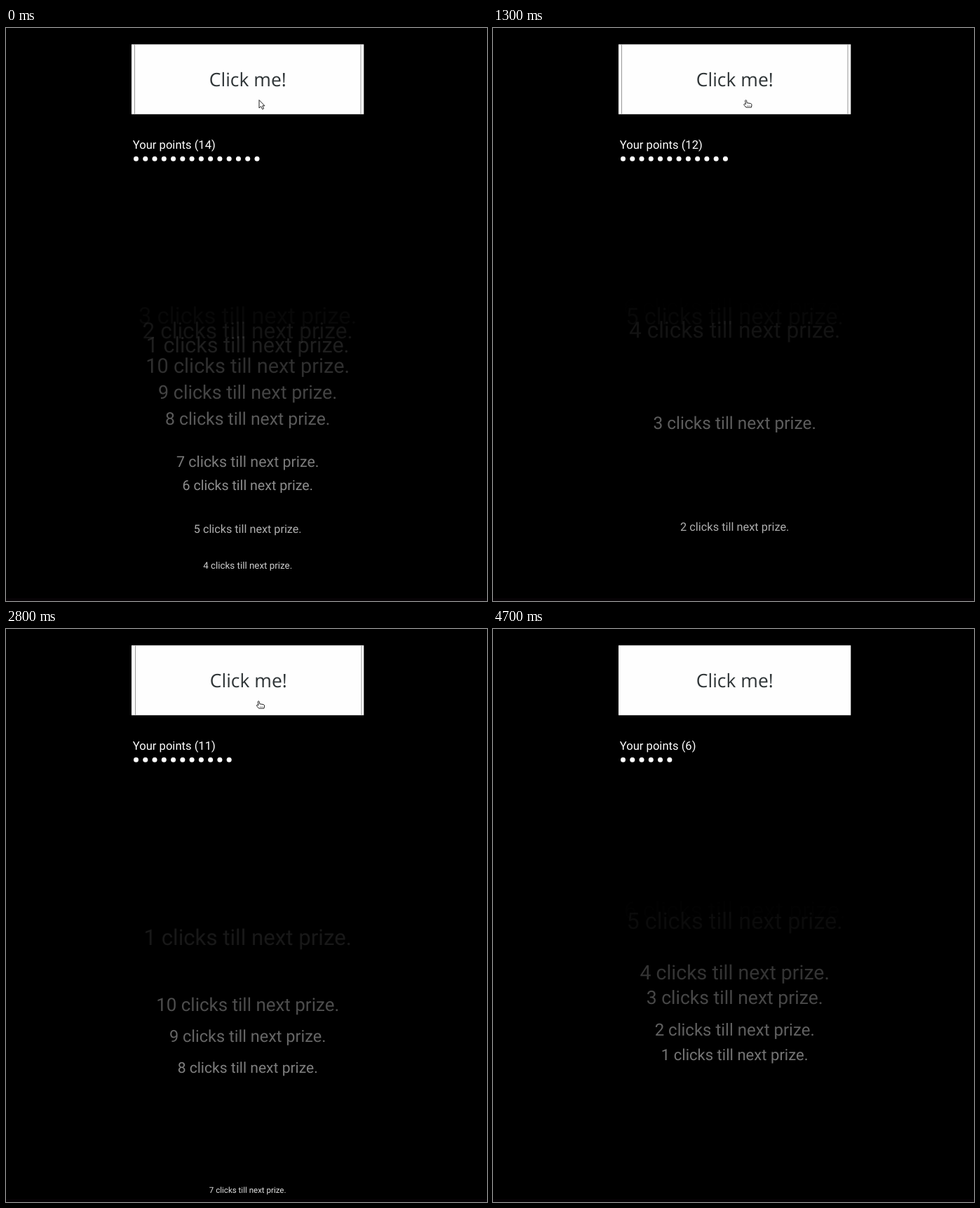
Recreate the animation shown at these times as an HTML page. Size 686 px wide and 816 px high, loop 4.8 s.

```html
<!DOCTYPE html>
<html lang="en">
<head>
<meta charset="utf-8">
<title>Click me!</title>
<style>
  html, body { margin: 0; width: 100%; height: 100%; overflow: hidden; background: #000; }
  svg { display: block; width: 686px; height: 816px; }
  text { font-family: Roboto, sans-serif; fill: #fff; text-rendering: geometricPrecision; }
  #label { font: 26.5px "Open Sans", "Noto Sans", sans-serif; fill: #2e3436; }
  #points { font-size: 16.6px; }
  #messages text, #label { text-anchor: middle; }
  #cursor path { fill: #fff; stroke: #222; stroke-linejoin: round; }
</style>
</head>
<body>
<svg viewBox="0 0 686 816">
  <rect width="686" height="816"/>
  <rect y="812" width="686" height="4" fill="#070306"/>
  <rect x="179" y="23.3" width="331.3" height="99.5" fill="#fefefe"/>
  <g id="face">
    <path id="focus" d="M183.5 23.5V122.5M506 23.5V122.5" stroke="#999" fill="none"/>
    <text id="label" x="344.8" y="83">Click me!</text>
  </g>
  <text id="points" x="180.8" y="171.8"></text>
  <g id="dots" fill="#fff"></g>
  <g id="messages"></g>
  <g id="cursor">
    <path id="arrow" d="M0 0V11.5L2.7 9L4.6 13.2L6.6 12.3L4.8 8.3H8Z"/>
    <g id="hand">
      <path d="M-1 .8Q0 -.6 1 .8L1.6 4.2L7 5Q8.6 5.5 8.4 7.5L7.8 10.5H.3L-2.8 6.8Q-2.8 5.3 -1.2 5.6L-.2 6.2Z"/>
      <path d="M2 8.5H6.8" style="stroke-dasharray:1 1.2"/>
    </g>
  </g>
</svg>
<script>
const LOOP = 4800, STEP = 100, RISE = 1900;
const NS = "http://www.w3.org/2000/svg";
const $ = id => document.getElementById(id);

// [clicks left, moment of the click, points afterwards]
const clicks = [
  [3, -1628, 14], [2, -1448, 14], [1, -1319, 14], [10, -1159, 14], [9, -984, 14],
  [8, -823, 14], [7, -595, 14], [6, -479, 14], [5, -276, 14], [4, -120, 14],
  [3, 540, 13], [2, 1056, 12], [1, 1562, 11], [10, 2048, 14], [9, 2225, 13],
  [8, 2390, 12], [7, 2935, 11], [6, 3132, 10], [5, 3323, 10], [4, 3776, 8],
  [3, 3938, 7], [2, 4126, 6], [1, 4259, 6]
];
// The page clock runs slightly unevenly against playback time.
const clockKeys = [[0, 0], [700, 700], [2000, 2090], [2800, 2960], [3300, 3485], [4000, 4185], [4700, 4895]];
const cursorX = [[0, 361], [100, 361], [700, 361], [2000, 360.2], [3600, 360.2], [4000, 349], [4100, 285], [4200, 159]];
const cursorY = [[0, 102.5], [3600, 102.5], [4000, 101.8], [4200, 101.8]];

function add(parent, tag, attrs) {
  const el = document.createElementNS(NS, tag);
  set(el, attrs);
  return parent.appendChild(el);
}
function set(el, attrs) {
  for (const name in attrs) el.setAttribute(name, attrs[name]);
}
function show(el, on) {
  el.style.display = on ? "" : "none";
}
function sample(keys, t) {
  let i = 1;
  while (i < keys.length - 1 && t > keys[i][0]) i++;
  const [t0, a] = keys[i - 1], [t1, b] = keys[i];
  return a + (b - a) * (t - t0) / (t1 - t0);
}
// cubic-bezier(0, 0, .58, 1)
function easeOut(x) {
  let lo = 0, hi = 1;
  for (let i = 0; i < 24; i++) {
    const s = (lo + hi) / 2;
    if (1.74 * s * s - 0.74 * s ** 3 < x) lo = s; else hi = s;
  }
  return lo * lo * (3 - 2 * lo);
}

const messages = clicks.map(([left]) => {
  const el = add($("messages"), "text", { x: 344.7 });
  el.textContent = `${left} clicks till next prize.`;
  return el;
});
const dots = Array.from({ length: 14 }, (_, i) =>
  add($("dots"), "circle", { cx: 185.5 + i * 13.27, cy: 186.2, r: 3.5 }));

function draw(t) {
  const now = sample(clockKeys, t);
  let points = 14, pressed = false;

  clicks.forEach(([, born, total], i) => {
    const age = now - born, alive = age >= 0 && age < RISE;
    show(messages[i], alive);
    if (age >= 0) points = total;
    if (!alive) return;
    const p = easeOut(age / RISE), size = 11.06 + 22.49 * p;
    set(messages[i], {
      y: 808 - 412 * p + 0.355 * size,
      "font-size": size,
      "fill-opacity": 0.9 * (1 - p)
    });
    const hold = i && born - clicks[i - 1][1] > 400 ? 200 : 50;
    if (age < hold) pressed = true;
  });

  $("points").textContent = `Your points (${points})`;
  dots.forEach((dot, i) => show(dot, i < points));

  const present = t < 4300;
  set($("face"), { transform: `translate(${pressed ? 1 : 0} 0)` });
  show($("focus"), present);
  show($("cursor"), present);
  const x = sample(cursorX, Math.min(t, 4200)), y = sample(cursorY, Math.min(t, 4200));
  const overButton = t >= STEP && x > 179;
  set($("cursor"), { transform: `translate(${x} ${y})` });
  show($("hand"), overButton);
  show($("arrow"), !overButton);
}

const start = performance.now();
function tick() {
  const t = (performance.now() - start) % LOOP;
  draw(Math.floor(t / STEP) * STEP);
  requestAnimationFrame(tick);
}
tick();
</script>
</body>
</html>
```
